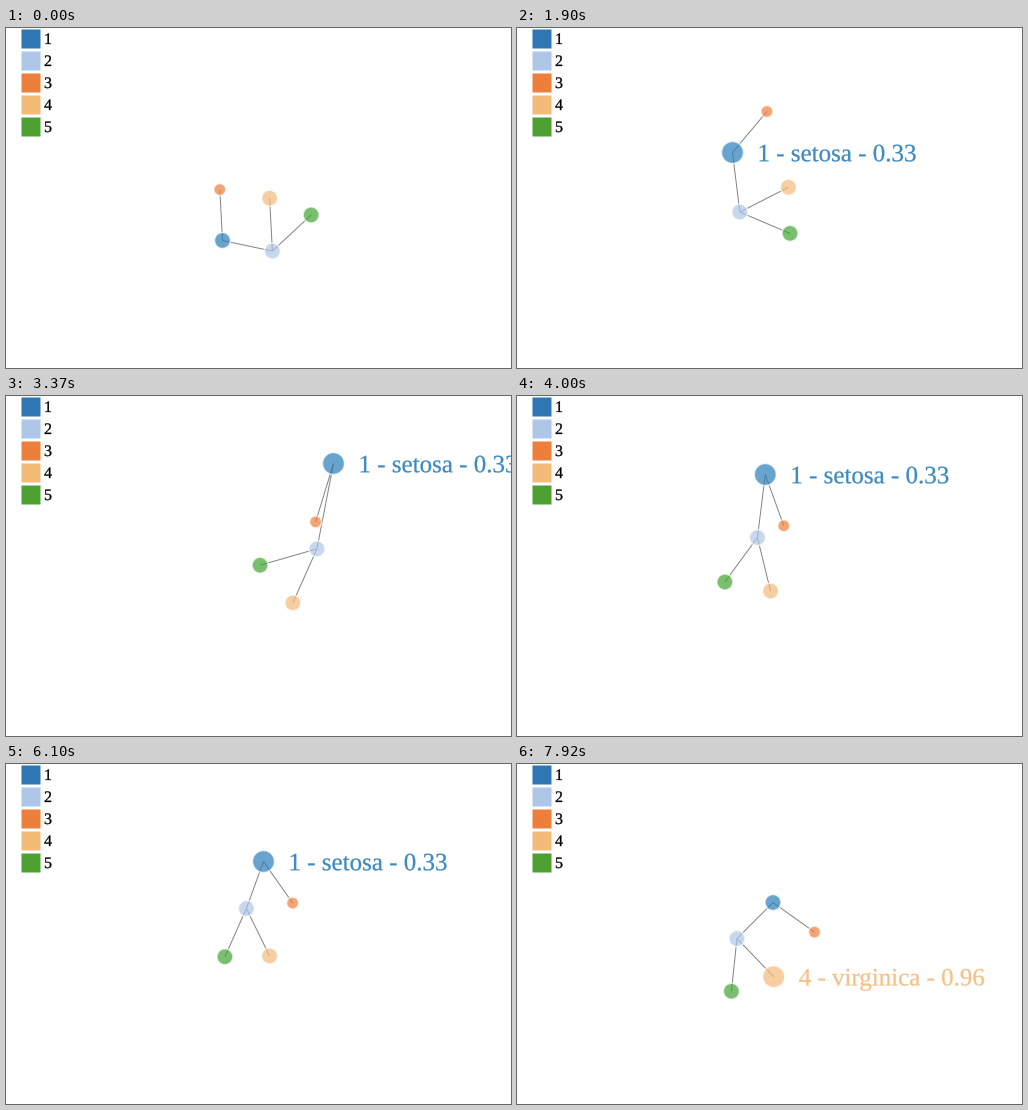
Animation of 505 by 340 pixels, one loop 7.99 s. Source, as a matplotlib script:

```python
import numpy as np
import matplotlib.pyplot as plt
from matplotlib.animation import FuncAnimation
from matplotlib.collections import LineCollection
from matplotlib.patches import Circle, Rectangle
from matplotlib.patheffects import Stroke

W, H, DPI = 505, 340, 100
PX = 72 / DPI  # points per pixel
LOOP, TICK = 7990, 10
HOLD, STEP = 500, 70
FADE = 750

plt.rcParams["font.family"] = "Liberation Serif"

LEGEND = ["#2e77b4", "#aec6e8", "#ee7f3b", "#f4ba7a", "#4ca030"]
FILLS = ["#2a7ebb", "#aec6e8", "#ee7f3b", "#f4ba7a", "#3fa431"]
RADII = [8, 8, 6, 8, 8]
LINKS = [(0, 1), (0, 2), (1, 3), (1, 4)]
LABELS = {0: "1 - setosa - 0.33", 3: "4 - virginica - 0.96"}
HOVERS = {0: (370, 6850), 3: (7230, 9999)}  # pointer enters, leaves

REST = 51   # relaxed link length
FAN = 25    # half angle between the two leaves

# Drag of the root: time, x, y, hub bearing, hub stretch, small node's
# bearing, bearing of the leaf fan (degrees, clockwise on screen)
DRAG = np.array([
    (1550, 216.5, 212.5, 12, 0, -93, -68),
    (1900, 215.5, 124.5, 83, 9, -50, -2),
    (2320, 220, 87, 94, 9, 10, 75),
    (2850, 285, 43, 103, 45, 90, 115),
    (3370, 327.5, 67.5, 101, 36, 107, 139),
    (4070, 246, 79, 97, 12, 68, 98),
    (4770, 249.5, 81.5, 104, 12, 60, 79),
    (6100, 257.5, 97.5, 110, -1, 55, 89),
    (6940, 254.5, 136, 127, 0, 37, 75),
    (7500, 256, 138.5, 135, 0, 35.5, 71),
])
TIMES, POSES = DRAG[:, 0], DRAG[:, 1:]


def tangents(p):
    """Monotone slopes: no overshoot, flat at turning points and ends."""
    d = np.diff(p, axis=0) / np.diff(TIMES)[:, None]
    a, b = d[:-1], d[1:]
    same = a * b > 0
    m = np.zeros_like(p)
    m[1:-1] = np.where(same, 2 * a * b / np.where(same, a + b, 1), 0)
    return m


SLOPES = tangents(POSES)


def pose(t):
    t = np.clip(t, TIMES[0], TIMES[-1])
    i = min(np.searchsorted(TIMES, t, side="right") - 1, len(TIMES) - 2)
    h = TIMES[i + 1] - TIMES[i]
    u = (t - TIMES[i]) / h
    s = u * u * (3 - 2 * u)
    return ((1 - s) * POSES[i] + s * POSES[i + 1]
            + h * u * (1 - u) ** 2 * SLOPES[i]
            - h * u * u * (1 - u) * SLOPES[i + 1])


def arm(length, bearing):
    a = np.radians(bearing)
    return length * np.array([np.cos(a), np.sin(a)])


def positions(t):
    x, y, hub_dir, stretch, small_dir, fan_dir = pose(t)
    root = np.array([x, y])
    hub = root + arm(REST + stretch, hub_dir)
    small = root + arm(REST + 0.28 * stretch, small_dir)
    leaf = REST + 2 + 0.17 * stretch
    return np.array([root, hub, small,
                     hub + arm(leaf, fan_dir - FAN),
                     hub + arm(leaf, fan_dir + FAN)])


def ease(u):
    u = min(max(u, 0), 1)
    return 4 * u ** 3 if u < 0.5 else 1 - 4 * (1 - u) ** 3


def hover(node, t):
    if node not in HOVERS:
        return 0
    enter, leave = HOVERS[node]
    return ease((t - enter) / FADE) - ease((t - leave) / FADE)


fig = plt.figure(figsize=(W / DPI, H / DPI), dpi=DPI, facecolor="white")
ax = fig.add_axes([0, 0, 1, 1])
ax.set(xlim=(0, W), ylim=(H, 0))
ax.axis("off")


def write(x, y, text, color, weight, **kw):
    """Text thickened by a thin outline of its own colour."""
    outline = Stroke(linewidth=weight * PX, foreground=color)
    return ax.text(x, y, text, color=color, va="baseline",
                   path_effects=[outline], **kw)


for i, color in enumerate(LEGEND):
    y = 22 * i
    ax.add_patch(Rectangle((15.5, y + 1.5), 19, 19, fc=color, lw=0, snap=False))
    write(38, y + 16, str(i + 1), "black", 0.3, size=16 * PX)

links = LineCollection([], colors="#666666", linewidths=PX, alpha=0.8, zorder=2)
ax.add_collection(links, autolim=False)

dots, labels = [], {}
for i, color in enumerate(FILLS):
    dot = Circle((0, 0), RADII[i], fc=color, ec="white", lw=1.5 * PX,
                 alpha=0.7, zorder=3 + i)
    dots.append(ax.add_patch(dot))
    if i in LABELS:
        labels[i] = write(0, 0, LABELS[i], color, 0.25, zorder=3.5 + i)


def draw(frame):
    t = frame * TICK
    t = 0 if t < HOLD else HOLD + (t - HOLD) // STEP * STEP
    pos = positions(t)
    links.set_segments([pos[[a, b]] for a, b in LINKS])
    for i, dot in enumerate(dots):
        k = hover(i, t)
        dot.center = tuple(pos[i])
        dot.set_radius(RADII[i] + 3 * k)
        if i in labels:
            size = 10 + 15 * k
            x, y = pos[i]
            labels[i].set_position((x + 12 + 13 * k, y + 0.35 * size))
            labels[i].set_fontsize(size * PX)
            labels[i].set_alpha(0.9 * k)
            labels[i].set_visible(k > 0.005)
    return [links, *dots, *labels.values()]


anim = FuncAnimation(fig, draw, frames=LOOP // TICK, interval=TICK,
                     repeat=True, repeat_delay=0, cache_frame_data=False)
plt.show()
```
